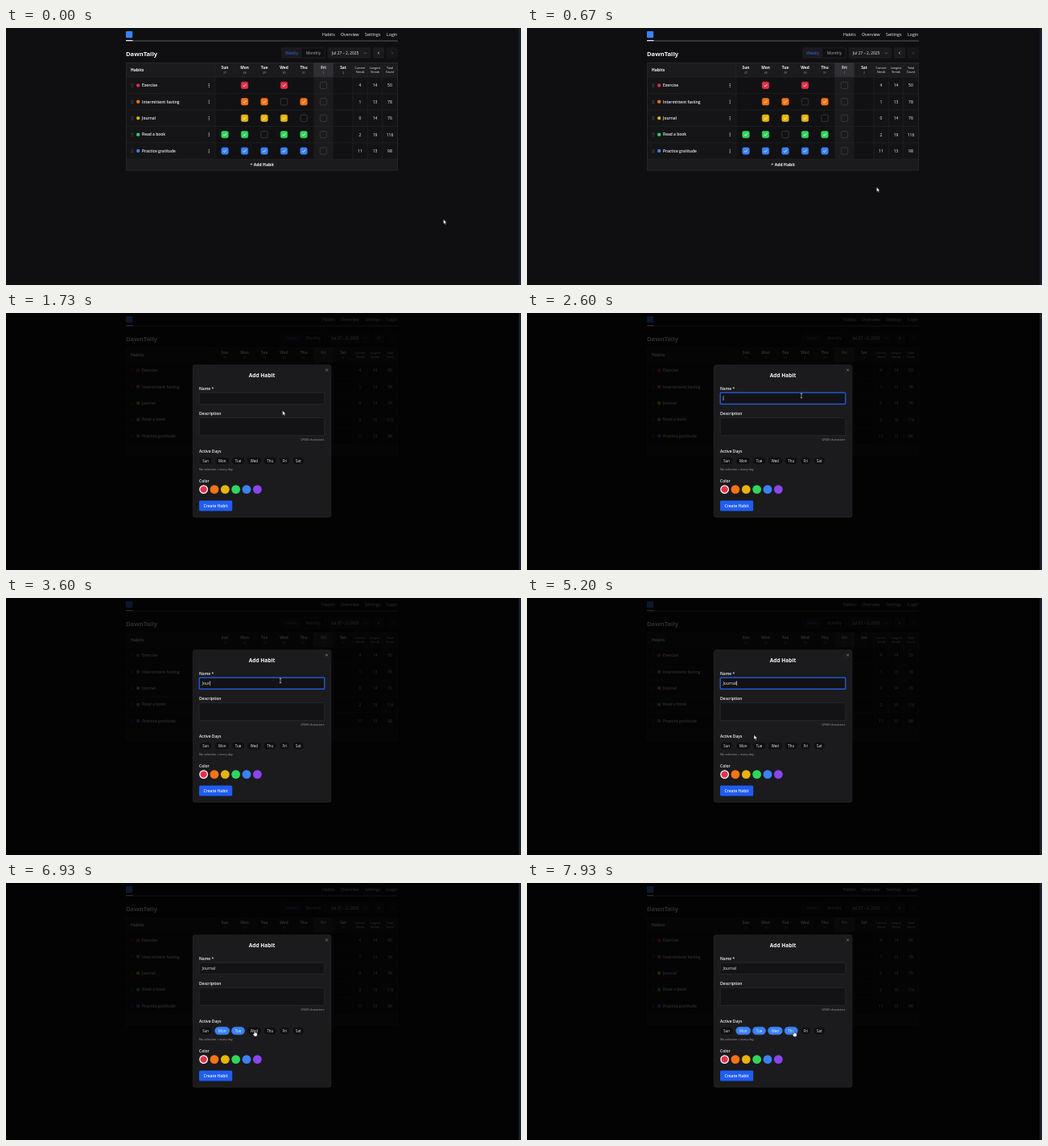
Write an HTML page that moves like this. It is 640 by 320 pixels and loops after 8000 ms.

```html
<!DOCTYPE html>
<html lang="en">
<head>
<meta charset="utf-8">
<title>Habit tracker</title>
<style>
html, body { margin: 0; height: 100%; overflow: hidden; background: #0f0f12; }
svg { display: block; width: 640px; height: 320px; font-family: "Open Sans", "Noto Sans", sans-serif; }
text { white-space: pre; }
</style>
</head>
<body>
<svg id="stage" viewBox="0 0 640 320"></svg>
<script>
const stage = document.getElementById("stage");
const LOOP = 8000, OPEN = 1480, FOCUS = 2250, TYPE = 3060, KEY = 160;
const RED = "#e5304a", ORANGE = "#f97316", YELLOW = "#e6b40e",
      GREEN = "#2fd65d", BLUE = "#3b82f6", PURPLE = "#8b45f0";
const PANEL = "#1b1b1e", LINE = "#29292d", DARK = "#0f0f11", WHITE = "#f4f4f5";

let layer = stage;
function add(tag, attrs, text) {
  const el = document.createElementNS("http://www.w3.org/2000/svg", tag);
  for (const k in attrs) el.setAttribute(k, attrs[k]);
  if (text) el.textContent = text;
  return layer.appendChild(el);
}
const rect = (x, y, w, h, fill, more) => add("rect", { x, y, width: w, height: h, fill, ...more });
const line = (d, stroke, width = 0.5, more) =>
  add("path", { d, stroke, "stroke-width": width, fill: "none", ...more });
const dot = (cx, cy, r, fill, more) => add("circle", { cx, cy, r, fill, ...more });
const label = (s, x, y, size, weight = 400, fill = WHITE, anchor = "start") =>
  add("text", { x, y, "font-size": size, "font-weight": weight, fill, "text-anchor": anchor }, s);
const centered = (s, x, y, size, weight, fill) => label(s, x, y, size, weight, fill, "middle");
const group = (parent = stage) => { layer = parent; return layer = add("g", {}); };

// Page header and toolbar
const days = ["Sun", "Mon", "Tue", "Wed", "Thu", "Fri", "Sat"];
group();
rect(0, 0, 640, 320, "#0f0f12");
rect(149, 4, 8.2, 8.2, BLUE, { rx: 1 });
line("M149 16H487", "#77777c", 0.7);
line("M149 15.6H157.5", WHITE, 1.1);
[["Habits", 393], ["Overview", 416], ["Settings", 446], ["Login", 473]]
  .forEach(([s, x]) => label(s, x, 10.4, 5.25));
label("DawnTally", 149, 34.6, 7.6, 700);

rect(342, 24, 55, 14, PANEL, { rx: 2 });
rect(367.5, 25.5, 28, 11, DARK, { rx: 1.5 });
centered("Weekly", 355, 32.9, 4.7, 400, "#2f6df0");
centered("Monthly", 382, 32.9, 4.7, 400, "#b4b4b8");
rect(399.5, 24, 54, 14, PANEL, { rx: 2 });
label("Jul 27 – 2, 2025", 405, 32.9, 4.8);
line("M444.8 30.5l1.6 1.6 1.6-1.6", "#8a8a90", 0.6);
rect(456, 24, 14, 14, PANEL, { rx: 2 });
rect(473, 24, 14, 14, "#161618", { rx: 2 });
line("M463.7 29.6l-1.4 1.5 1.4 1.5", WHITE, 0.7);
line("M479.3 29.6l1.4 1.5-1.4 1.5", "#5c5c61", 0.7);

// Habit table
const colX = i => 272 + i * 24.5;
const statX = [440, 458.6, 477];
rect(149.3, 43.3, 337.4, 133.8, "#111113");
rect(149.3, 43.3, 337.4, 17.9, PANEL);
rect(149.3, 61.2, 110.4, 102.4, "#151517");
rect(431, 61.2, 55.7, 102.4, "#131315");
rect(382.2, 43.3, 24.5, 17.9, "#303034");
rect(382.2, 61.2, 24.5, 102.4, PANEL);
const addRow = rect(149.3, 163.4, 337.4, 13.7, PANEL);
label("Habits", 155, 54.2, 5, 700);
days.forEach((d, i) => {
  centered(d, colX(i), 51.3, 4.8, 700);
  centered(["27", "28", "29", "30", "31", "1", "2"][i], colX(i), 57.2, 3.7, 400, "#a0a0a6");
});
["Current Streak", "Longest Streak", "Total Count"].forEach((s, i) =>
  s.split(" ").forEach((w, j) => centered(w, statX[i], 51 + j * 5, 3.65)));

function box(x, y, state, color) {
  const on = state === "x";
  rect(x - 4.2, y - 4.2, 8.4, 8.4, on ? color : "none",
    { rx: 1.8, stroke: on ? color : state === "o" ? "#4a4a4f" : "#17171a", "stroke-width": 0.6 });
  if (on) line(`M${x - 1.9} ${y + 0.1}l1.3 1.4 2.6-2.9`, "#fff", 0.8);
}
[["Exercise", RED, "-x-x-o-", 4, 14, 50],
 ["Intermittent fasting", ORANGE, "-xxoxo-", 1, 13, 78],
 ["Journal", YELLOW, "-xxxoo-", 0, 14, 76],
 ["Read a book", GREEN, "xxoxxo-", 2, 19, 116],
 ["Practice gratitude", BLUE, "xxxxxo-", 11, 13, 98]
].forEach(([name, color, marks, ...stats], r) => {
  const y = 71.4 + r * 20.42;
  for (let k = 0; k < 6; k++) dot(156 + (k % 2) * 1.6, y - 1.7 + (k >> 1) * 1.7, 0.45, "#85858a");
  rect(162.2, y - 2, 4, 4, color, { rx: 1.4 });
  label(name, 169, y + 1.8, 4.9, 600);
  for (let k = -1; k < 2; k++) dot(252.2, y + k * 1.8, 0.55, WHITE);
  [...marks].forEach((m, i) => box(colX(i), y, m, color));
  stats.forEach((s, i) => centered(String(s), statX[i], y + 1.9, 5.1));
  line(`M149 ${y - 10.2}H487`, LINE);
});
line("M149 163.4H487M259.8 43V163.4M431 43V163.4M449.4 43V163.4M467.8 43V163.4", LINE);
rect(149.3, 43.3, 337.4, 133.8, "none", { stroke: "#323236", "stroke-width": 0.6 });
centered("+ Add Habit", 318.3, 172.2, 5.1, 700);

// Dialog
const shade = (group(), rect(0, 0, 640, 320, "#000", { opacity: 0 }));
const dialog = group();
rect(232.3, 64.8, 171.6, 189.4, PANEL, { rx: 2.5, stroke: "#2c2c30", "stroke-width": 0.6 });
centered("Add Habit", 318, 79.5, 6.6, 700);
line("M397.1 69.5l3 3m0-3l-3 3", "#a0a0a6", 0.6);
label("Name *", 240, 95.6, 4.9, 600);
const field = rect(240.2, 99.2, 155.6, 14.2, "#131315", { rx: 1 });
const typed = label("", 243.5, 108, 5);
const caret = rect(0, 103.4, 0.6, 5.6, WHITE);
label("Description", 240, 127.2, 4.95, 600);
rect(240.2, 130.4, 155.6, 22.2, "#131315", { rx: 1, stroke: "#323236", "stroke-width": 0.6 });
label("0/500 characters", 395.6, 159, 3.75, 400, "#a0a0a6", "end");
label("Active Days", 240, 174.1, 4.95, 600);
const pillEdges = [[240.3, 256], [259.6, 277.8], [280.3, 296.6], [299.4, 317.4],
                   [320, 336.4], [340, 352.6], [356.2, 370.4]];
const pills = pillEdges.map(([a, b], i) => {
  const p = rect(a, 179.2, b - a, 9.6, DARK, { rx: 4.8, "stroke-width": 0.4 });
  centered(days[i], (a + b) / 2, 185.6, 4.4);
  return p;
});
label("No selection = every day.", 240, 196, 3.7, 400, "#a0a0a6");
label("Color", 240, 210.9, 4.95, 600);
[RED, ORANGE, YELLOW, GREEN, BLUE, PURPLE].forEach((c, i) =>
  dot(245.6 + i * 13.35, 219.6, i ? 5.4 : 4.8, c, i ? {} : { stroke: "#fff", "stroke-width": 1.2 }));
rect(240, 233.4, 41.2, 13, "#1f5df0", { rx: 1.5 });
centered("Create Habit", 260.6, 241.8, 5, 600);

group();
rect(637.2, 0, 2.8, 320, "#1c2130");

// Pointer shapes, with the hot spot at 0,0
const pointer = group();
const edge = { stroke: "#000", "stroke-width": 0.5 };
const shapes = {
  arrow: add("path", { d: "M0 0V6.1L1.4 4.9 2.4 7 3.4 6.5 2.5 4.5H4.3Z", fill: "#fff", ...edge }),
  beam: line("M-1.2-2.7H1.2M0-2.7V2.7M-1.2 2.7H1.2", "#e8e8ea", 0.6),
  hand: add("path", {
    d: "M-.6 0Q0-.7.6 0V2.2Q1.3 1.8 1.7 2.4 2.4 2.1 2.7 2.8 3.5 2.7 3.5 3.5V5Q3.4 6.6 2.4 7H0Q-1.3 5.8-2 4.2-1.6 3.3-.6 4.1Z",
    fill: "#fff", ...edge })
};

// Time, x, y
const path = [[0, 543.5, 238], [100, 543.5, 238], [1150, 350.5, 167.2], [1500, 350.5, 167.2],
  [1730, 343.5, 121.3], [2120, 341, 103], [4450, 341, 103], [5200, 282, 170.2],
  [5560, 269, 184], [6050, 269, 184], [6380, 289, 184], [6600, 289, 184],
  [6900, 308.8, 184], [7230, 308.8, 184], [7560, 331.8, 184.5], [LOOP, 331.8, 184.5]];
const clicks = [0, 5750, 6450, 7060, 7700];

function pointerAt(t) {
  const i = path.findIndex(p => p[0] > t);
  const [t0, x0, y0] = path[i - 1], [t1, x1, y1] = path[i];
  const u = (t - t0) / (t1 - t0), e = u * u * (3 - 2 * u);
  return [x0 + (x1 - x0) * e, y0 + (y1 - y0) * e];
}
const inside = (x, y, a, b, c, d) => x > a && x < c && y > b && y < d;

function draw(t) {
  const [x, y] = pointerAt(t);
  const open = Math.min(1, Math.max(0, (t - OPEN) / 150));
  const ease = 1 - (1 - open) ** 2;
  shade.setAttribute("opacity", 0.81 * ease);
  dialog.setAttribute("opacity", ease);
  const s = 0.95 + 0.05 * ease;
  dialog.setAttribute("transform", `translate(${318 * (1 - s)} ${159.5 * (1 - s)}) scale(${s})`);
  addRow.setAttribute("fill", open < 1 && inside(x, y, 149, 163.4, 487, 177) ? "#353538" : PANEL);

  const focused = t >= FOCUS && t < clicks[1];
  field.setAttribute("stroke", focused ? "#2563eb" : "#323236");
  field.setAttribute("stroke-width", focused ? 1.2 : 0.6);
  const count = Math.max(0, Math.min(7, Math.floor((t - TYPE) / KEY) + 1));
  typed.textContent = "Journal".slice(0, count);
  caret.setAttribute("x", 243.7 + (count ? typed.getComputedTextLength() : 0));
  const lastKey = count ? TYPE + (count - 1) * KEY : FOCUS;
  caret.setAttribute("opacity", focused && (t - lastKey) % 1060 < 530 ? 1 : 0);

  pills.forEach((p, i) => {
    const on = clicks[i] && t >= clicks[i];
    p.setAttribute("fill", on ? BLUE : DARK);
    p.setAttribute("stroke", on ? BLUE : "#29292d");
  });

  let kind = "arrow";
  if (open === 1) {
    if (inside(x, y, 240, 99, 396, 113.5) || inside(x, y, 240, 130, 396, 153)) kind = "beam";
    else if (pillEdges.some(([a, b]) => inside(x, y, a, 179, b, 189))) kind = "hand";
  }
  for (const k in shapes) shapes[k].setAttribute("visibility", k === kind ? "visible" : "hidden");
  pointer.setAttribute("transform", `translate(${x} ${y})`);
}

const start = performance.now();
function tick() {
  draw((performance.now() - start) % LOOP);
  requestAnimationFrame(tick);
}
tick();
</script>
</body>
</html>
```
